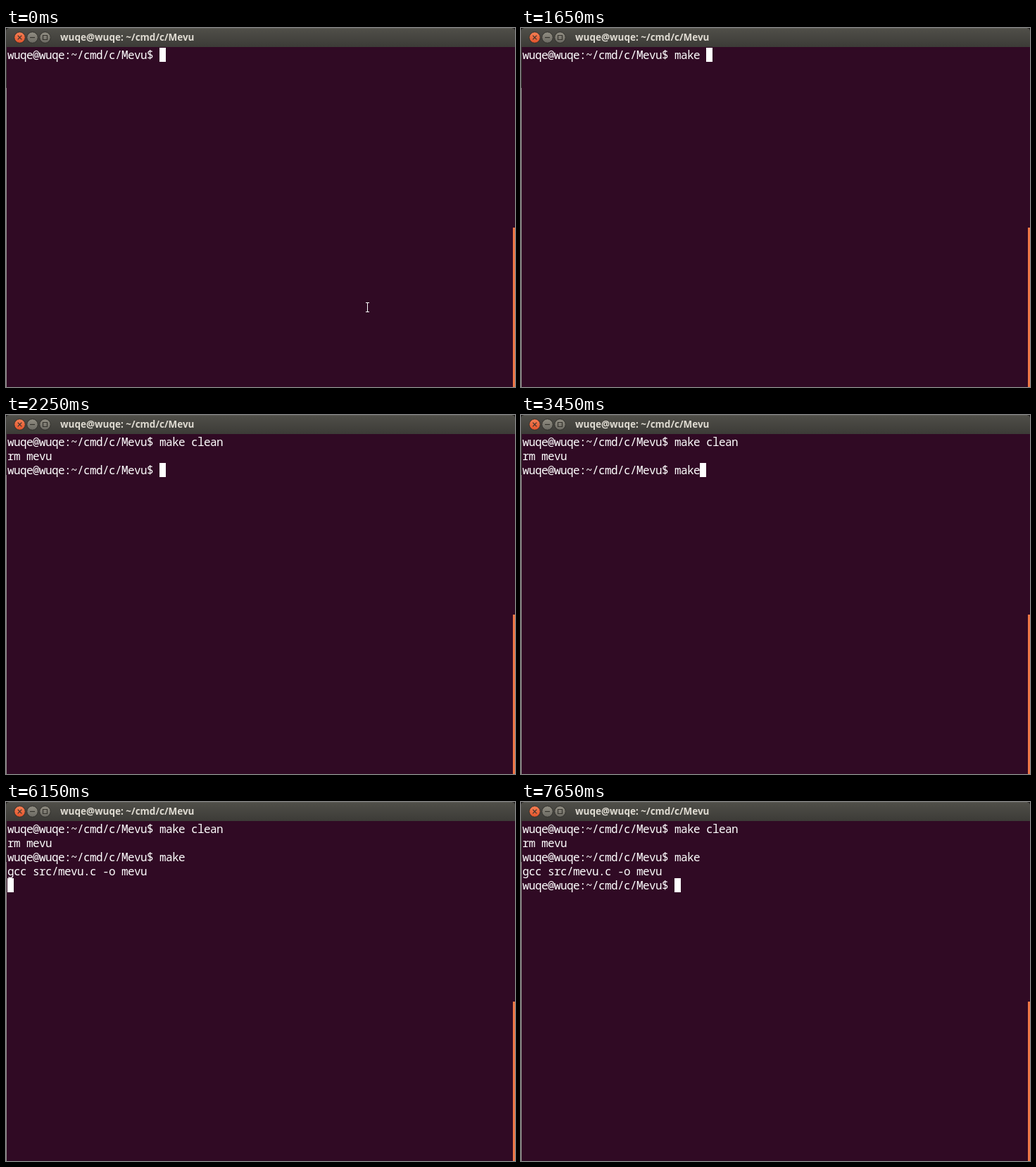
An HTML page for the animation above (8000 ms loop, 723 by 509 pixels).

```html
<!DOCTYPE html>
<html lang="en">
<head>
<meta charset="utf-8">
<title>Terminal</title>
<style>
  html, body { margin: 0; width: 100%; height: 100%; overflow: hidden; background: #300a24; }
  .stage { position: relative; width: 723px; height: 509px; overflow: hidden; background: #300a24; }
  .stage > * { position: absolute; }

  .chrome { left: 0; top: 0; }
  .title { font: bold 13.5px "Open Sans", "Noto Sans", sans-serif; fill: #dfdbd2; }

  .row, .cmd {
    height: 20px;
    font: 16px/20px "Noto Sans Mono", "DejaVu Sans Mono", monospace;
    letter-spacing: -.6px;
    white-space: pre;
    color: #fff;
  }
  .row { left: 2px; top: calc(28px + 20px * var(--n)); }
  .cmd { position: absolute; left: 216px; top: 0; overflow: hidden; }
  .cursor { left: 218px; top: 28px; width: 9px; height: 20px; background: #fff; }
  .pointer { left: 510px; top: 389px; }

  /* Every change is a hard cut on one shared 8 s clock. */
  .cmd, .cursor, .pointer, .late { animation: 8s step-end infinite; }
  .pointer { animation-name: hide; }
  .clean { animation-name: type-clean; }
  .build { animation-name: type-build; }
  .cursor { animation-name: cursor; }
  .after-clean { animation-name: show-clean; }
  .after-build { animation-name: show-build; }
  .after-done { animation-name: show-done; }

  @keyframes hide { 0% { opacity: 1 } 11.25%, 100% { opacity: 0 } }
  @keyframes show-clean { 0% { opacity: 0 } 28.125%, 100% { opacity: 1 } }
  @keyframes show-build { 0% { opacity: 0 } 54.375%, 100% { opacity: 1 } }
  @keyframes show-done { 0% { opacity: 0 } 90%, 100% { opacity: 1 } }

  @keyframes type-clean {
    0% { width: 0 }
    11.25% { width: 9px }
    13.125% { width: 27px }
    15% { width: 36px }
    20.625% { width: 45px }
    22.5% { width: 54px }
    24.375% { width: 72px }
    26.25%, 100% { width: 90px }
  }
  @keyframes type-build {
    0% { width: 0 }
    41.25% { width: 18px }
    43.125%, 100% { width: 36px }
  }
  @keyframes cursor {
    0% { transform: none; opacity: 1 }
    11.25% { transform: translate(9px, 0) }
    13.125% { transform: translate(27px, 0) }
    15% { transform: translate(36px, 0) }
    20.625% { transform: translate(45px, 0) }
    22.5% { transform: translate(54px, 0) }
    24.375% { transform: translate(72px, 0) }
    26.25% { transform: translate(90px, 0) }
    28.125% { transform: translate(0, 40px) }
    39.375% { opacity: 0 }
    41.25% { transform: translate(18px, 40px); opacity: 1 }
    43.125% { transform: translate(36px, 40px) }
    54.375% { transform: translate(-216px, 80px) }
    65.625% { opacity: 0 }
    76.875% { opacity: 1 }
    88.125% { opacity: 0 }
    95.625%, 100% { transform: translate(0, 80px); opacity: 1 }
  }
</style>
</head>
<body>
<div class="stage">
  <svg class="chrome" width="723" height="509">
    <defs>
      <linearGradient id="bar" x2="0" y2="1">
        <stop stop-color="#504f49"/>
        <stop offset="1" stop-color="#3c3b37"/>
      </linearGradient>
      <linearGradient id="close" x2="0" y2="1">
        <stop stop-color="#f58055"/>
        <stop offset="1" stop-color="#e2532b"/>
      </linearGradient>
      <linearGradient id="button" x2="0" y2="1">
        <stop stop-color="#918e83"/>
        <stop offset="1" stop-color="#6b6962"/>
      </linearGradient>
    </defs>
    <rect width="723" height="27" fill="#1d1a19"/>
    <path d="M0 27V5Q0 0 5 0H718Q723 0 723 5V27Z" fill="url(#bar)"/>
    <path d="M4 .5H719" stroke="#5d5c56"/>
    <g stroke="#2f2e2a">
      <circle cx="19.5" cy="13.5" r="7.8" fill="url(#close)"/>
      <circle cx="37.5" cy="13.5" r="7.8" fill="url(#button)"/>
      <circle cx="55.5" cy="13.5" r="7.8" fill="url(#button)"/>
    </g>
    <g fill="none" stroke="#35332e" stroke-width="1.2">
      <path d="M16.7 10.7l5.6 5.6m0-5.6l-5.6 5.6"/>
      <path d="M34 13.5h7"/>
      <path d="M52.5 10.5h6v6h-6z"/>
    </g>
    <text class="title" x="77" y="18">wuqe@wuqe: ~/cmd/c/Mevu</text>
    <path d="M.5 27V85" stroke="#3c3b37"/>
    <path d="M.5 85V509" stroke="#8f8b89"/>
    <rect x="720" y="283" width="3" height="226" fill="#f07746"/>
  </svg>

  <div class="row" style="--n:0">wuqe@wuqe:~/cmd/c/Mevu$ <span class="cmd clean">make clean</span></div>
  <div class="row late after-clean" style="--n:1">rm mevu</div>
  <div class="row late after-clean" style="--n:2">wuqe@wuqe:~/cmd/c/Mevu$ <span class="cmd build">make</span></div>
  <div class="row late after-build" style="--n:3">gcc src/mevu.c -o mevu</div>
  <div class="row late after-done" style="--n:4">wuqe@wuqe:~/cmd/c/Mevu$ </div>
  <div class="cursor"></div>

  <svg class="pointer" width="7" height="14" shape-rendering="crispEdges">
    <path d="M1 .5H6M3.5 0V14M1 13.5H6" fill="none" stroke="#fff"/>
  </svg>
</div>
</body>
</html>
```
